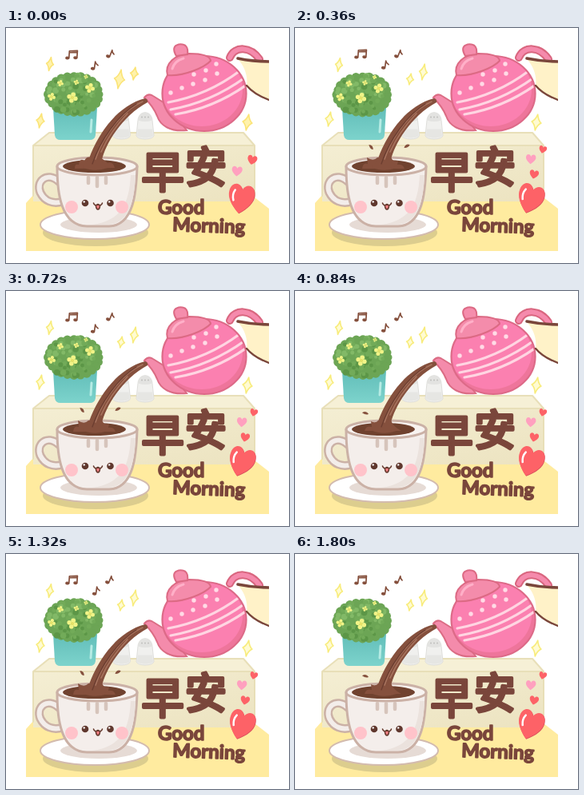
An HTML page for the animation above (1.92 s loop, 354x294 px).

```html
<!DOCTYPE html>
<html lang="zh-Hant">
<head>
<meta charset="utf-8">
<title>早安</title>
<style>
html, body { margin: 0; width: 354px; height: 294px; overflow: hidden; background: #fff; }
svg { display: block; }
text { fill: #7a463b; stroke: #7a463b; stroke-linejoin: round; stroke-linecap: round; }
.zh { font-family: "Noto Sans CJK TC", "Noto Sans CJK", sans-serif; font-weight: 400; stroke-width: 4; text-anchor: middle; }
.en { font-family: Lato, "Open Sans", sans-serif; font-weight: 700; font-size: 24px; stroke-width: 1.6; }
.line { fill: none; stroke-linecap: round; stroke-linejoin: round; }
</style>
</head>
<body>
<svg width="354" height="294" viewBox="0 0 354 294">
  <defs>
    <linearGradient id="pot" x2="0" y2="1"><stop stop-color="#62beb9"/><stop offset="1" stop-color="#7dd3cc"/></linearGradient>
    <linearGradient id="front" x2="1" y2="1"><stop stop-color="#f4eed3"/><stop offset="1" stop-color="#ece3c0"/></linearGradient>
    <clipPath id="body"><ellipse cx="248" cy="82" rx="52" ry="47"/></clipPath>
    <clipPath id="arm"><path d="M280 30H329V100H280Z"/></clipPath>
  </defs>

  <!-- counter -->
  <path d="M34 209L25 219V279H329V226L311 212Z" fill="#ffeb9f"/>
  <path d="M34 147H311V217H34Z" fill="url(#front)"/>
  <path d="M54 131H297L311 147H34Z" fill="#f6f0d6"/>
  <path class="line" d="M34 147L54 131H297L311 147H34V210M311 147V212" stroke="#e8dfb8" stroke-width="2"/>

  <!-- plant -->
  <path d="M59 100H114L112 134Q111 140 105 140H68Q62 140 61 134Z" fill="url(#pot)"/>
  <path class="line" d="M107 115L106 130" stroke="#b5ebe4" stroke-width="3"/>
  <g id="plant"></g>
  <g id="shakers"></g>

  <!-- teapot -->
  <path class="line" d="M280 37C286 22 306 23 317 39" stroke="#d9667f" stroke-width="10"/>
  <path class="line" d="M280 37C286 22 306 23 317 39" stroke="#f58aac" stroke-width="6"/>
  <path d="M173 87Q178 81 184 85L200 95L226 128C205 130 193 122 189 110Q184 98 173 87Z" fill="#f48bab" stroke="#db6c84" stroke-width="2"/>
  <g clip-path="url(#body)">
    <path d="M190 30H305V135H190Z" fill="#ee759b"/>
    <ellipse cx="245" cy="77" rx="51" ry="46" fill="#fb80b0"/>
    <path class="line" d="M203 93Q252 84 292 54M206 102Q256 93 299 62M212 108Q260 100 301 71" stroke="#ffd5e2" stroke-width="3.2"/>
    <g id="dots" fill="#ffdbe6"></g>
  </g>
  <ellipse cx="248" cy="82" rx="52.500" ry="47" fill="none" stroke="#dd6a88" stroke-width="2.200"/>
  <path d="M202 59C198 44 212 33 229 32C244 32 255 34 256 41C249 49 222 61 202 59Z" fill="#f48cab" stroke="#dc6a84" stroke-width="2"/>
  <path class="line" d="M208 51Q211 41 222 38" stroke="#ffb0c8" stroke-width="3"/>
  <path d="M213 35Q206 23 216 20.500Q229 19 227 33Z" fill="#f58dac" stroke="#dc6a84" stroke-width="2"/>
  <g clip-path="url(#arm)">
    <path d="M290 39Q309 43 330 42V91Q310 84 301 73C303 60 298 47 290 39Z" fill="#fff2c8"/>
    <path class="line" d="M290 38Q309 42 332 42" stroke="#7a463b" stroke-width="3.600"/>
    <path class="line" d="M301 72Q311 84 332 91" stroke="#7a463b" stroke-width="2.400"/>
  </g>

  <!-- saucer and cup -->
  <ellipse cx="112" cy="256" rx="66" ry="17" fill="#dccd8e"/>
  <ellipse cx="111" cy="246" rx="68" ry="18" fill="#fff" stroke="#d3bbae" stroke-width="2"/>
  <ellipse cx="116" cy="246" rx="48" ry="10" fill="#e6dbd5"/>
  <g class="line">
    <path id="handle" d="M66 192C51 179 37 192 43 206C48 216 58 221 71 217" stroke="#cbb1a6" stroke-width="11"/>
    <path d="M66 192C51 179 37 192 43 206C48 216 58 221 71 217" stroke="#f3edea" stroke-width="6"/>
  </g>
  <path d="M64 174C64 205 68 247 101 248H129C160 247 163 205 164 174Z" fill="#f4eeeb" stroke="#cbb1a6" stroke-width="3"/>
  <path d="M156 184C154 220 144 241 108 246H129C156 244 161 210 162 184Z" fill="#ebe2dd"/>
  <ellipse cx="114" cy="173" rx="50" ry="11" fill="#f8f3f0" stroke="#cbb1a6" stroke-width="3"/>
  <ellipse cx="110.500" cy="173" rx="39.500" ry="8" fill="#70422f"/>
  <path class="line" d="M103 187V194M114 187V198M125 187V194" stroke="#d6c4bb" stroke-width="4.500"/>
  <circle cx="82" cy="224" r="8" fill="#ffc3ca"/><circle cx="145" cy="224" r="8" fill="#ffc3ca"/>
  <g id="eyes"></g>
  <path d="M112.500 222H117.500Q117 227 115 227T112.500 222" fill="#f27f84"/>
  <path class="line" d="M109.500 219Q111 223.500 115 220.500Q119 223.500 120.500 219M112.500 223Q113 227 115 227T117.500 223" stroke="#65392d" stroke-width="1.600"/>

  <!-- pour -->
  <g id="splash"></g>
  <path d="M174 88C142 96 117 128 104 163Q101 171 95 174Q110 181 127 175Q120 172 120 165C124 146 145 110 177 93Q178 89 174 88Z" fill="#85503d"/>
  <path class="line" d="M171 92C147 102 122 133 112 164M152 107Q130 130 119 155" stroke="#a8745f" stroke-width="1.600"/>
  <path class="line" d="M163 95C140 109 118 140 108 170" stroke="#6b3d30" stroke-width="1.300"/>

  <text class="zh" x="196" y="200" font-size="53">早</text>
  <text class="zh" x="250" y="193" font-size="52">安</text>
  <text class="en" x="190" y="233">Good</text>
  <text class="en" x="208" y="254" transform="rotate(2 208 254)">Morning</text>

  <g id="notes"></g>
  <g id="stars"></g>
  <g id="hearts"></g>
</svg>
<script>
const STEP = 120, LOOP = 1920;
const RED = "#fd6267", PINK = "#ffa0bf", BROWN = "#85503d";
const $ = id => document.getElementById(id);
const disc = (x, y, r, fill) => `<circle cx="${x}" cy="${y}" r="${r}" fill="${fill}"/>`;
const place = (x, y, turn, body) => `<g transform="translate(${x} ${y}) rotate(${turn})">${body}</g>`;

function random(seed) {
  return () => (seed = seed * 16807 % 2147483647) / 2147483647;
}

function heart(x, y, r, turn, fill) {
  return place(x, y, turn, `<path d="M0 1C-.6.55-1.05.1-1-.4C-.95-1.08-.2-1.08 0-.5C.2-1.08.95-1.08 1-.4C1.05.1.6.55 0 1Z"
    transform="scale(${r})" fill="${fill}"/>`);
}

function bigHeart(x, y, turn) {
  const shape = '<path d="M0 19C-10 11-17 2-16-7C-15-19-4-20 0-11C4-20 15-19 16-7C17 2 10 11 0 19Z" ';
  return place(x, y, turn, shape + 'fill="#d84f5b" transform="translate(.7 .5)"/>' + shape + `fill="${RED}"/>` +
    '<path class="line" d="M-9-9Q-12-3-9 4" stroke="#fff" stroke-width="2.5"/>');
}

function star(x, y, w, h, line, fill) {
  const a = w * .3, b = h * .25;
  return place(x, y, 10, `<path d="M0-${h}Q${a}-${b} ${w} 0Q${a} ${b} 0 ${h}Q-${a} ${b}-${w} 0Q-${a}-${b} 0-${h}Z"
    fill="${fill}" stroke="${line}" stroke-width="1.6" stroke-linejoin="round"/>`);
}

function flower(x, y, r) {
  let s = "";
  for (let i = 0; i < 4; i++) {
    const a = i * Math.PI / 2 + .3;
    s += disc(x + Math.cos(a) * r, y + Math.sin(a) * r, r * .7, "#f1f487");
  }
  return s + disc(x, y, r * .5, "#e6e268");
}

function bush() {
  const rnd = random(71);
  let s = '<ellipse cx="85" cy="83" rx="34" ry="26" fill="#6ca555"/>';
  for (let i = 0; i < 24; i++) {
    const a = i * Math.PI / 12;
    s += disc(85 + Math.cos(a) * 32, 83 + Math.sin(a) * 23, 4.5 + rnd() * 1.5, "#6ca555");
  }
  for (let i = 0; i < 90; i++) {
    const a = rnd() * 6.28, d = Math.sqrt(rnd());
    const y = 83 + Math.sin(a) * d * 25, tone = rnd() + (y - 83) / 80;
    s += disc(85 + Math.cos(a) * d * 33, y, 2 + rnd() * 2, tone > .65 ? "#5c9647" : tone > .3 ? "#72ab59" : "#82b967");
  }
  const blooms = [[83, 87, 4], [105, 75, 3.6], [68, 69, 2.4], [57, 86, 3], [100, 61, 1.6], [88, 68, 2]];
  return s + blooms.map(b => flower(...b)).join("");
}

function note(x, y, turn, pair) {
  const d = pair ? "M-4 4V-5L6-6V3M-4-3L6-4" : "M1 4V-5Q2-2 5-1";
  const heads = pair ? [[-6, 4], [4, 3]] : [[-1, 4]];
  return place(x, y, turn, `<path class="line" d="${d}" stroke="${BROWN}" stroke-width="1.7"/>` +
    heads.map(([a, b]) => `<ellipse cx="${a}" cy="${b}" rx="2.6" ry="2" fill="${BROWN}"/>`).join(""));
}
const tune = (dx, dy) => note(83, 34 + dy, 4, true) + note(110 + dx, 47 - dx / 2, 8) + note(130 - dx / 2, 32, 22);

const sky = (line, fill, w, h, dx) =>
  star(55, 45 + dx / 2, 4.5, 8.5, line, fill) + star(142 + dx, 64, w, h, line, fill) +
  star(160.5, 57 - dx, 5, 8 + dx, line, fill) + star(43, 116 - dx, 5, 9, line, fill) + star(302, 118, 6, 10, line, fill);

const drop = (x, y, turn) => place(x, y, turn, `<path d="M-4-1Q1-4 4 1Q1 3-4-1Z" fill="${BROWN}"/>`);
const crown = d => `<path d="${d}" fill="${BROWN}"/>`;

// Each layer: the order in which its drawings follow, one digit per step, and the drawings.
const layers = {
  hearts: ["0011221122110011", [
    heart(308, 165, 6, 12, RED) + heart(289, 179, 6.5, 6, PINK) + bigHeart(294, 213, 10),
    heart(310, 152, 4.8, 14, RED) + heart(295, 164, 6.2, 5, PINK) + heart(299, 183, 5.7, 12, RED) + bigHeart(294.5, 213, 18),
    heart(288, 161, 6, 12, RED) + heart(304, 167, 4.8, 10, RED) + heart(296, 182, 6, 0, PINK) + bigHeart(294, 214, 2)
  ]],
  stars: ["0011111111110011", [
    sky("#fbe477", "#fff2ac", 6.5, 12, 0),
    sky("#f8ec7c", "#fffbd2", 4.5, 7, 2)
  ]],
  notes: ["0112", [tune(0, 0), tune(0, -1), tune(2, -1)]],
  plant: ["0011110000000011", [bush(), place(-.5, .5, 0, bush())]],
  splash: ["02120121", [
    crown("M86 176Q86 169 91 171Q92 162 98 166Q102 159 107 163L121 164Q125 167 127 169Q134 167 136 175Z"),
    crown("M87 175Q89 168 96 170L95 163Q101 166 104 162L120 162Q123 170 133 175Z") + drop(88, 153, -5),
    crown("M84 176Q85 168 91 170L90 162Q98 167 103 162H120Q123 168 129 166L128 171Q135 170 137 176Z") + drop(95, 149, 35) + drop(140, 148, -45)
  ]]
};

$("dots").innerHTML = [[206, 81], [220, 75], [234, 70], [249, 65], [264, 57], [235, 58], [250, 53], [263, 45]]
  .map(([x, y]) => `<circle cx="${x}" cy="${y}" r="2.7"/>`).join("");

$("eyes").innerHTML = [99, 130.5]
  .map(x => disc(x, 219, 4.3, "#60382e") + disc(x - 1.3, 217.4, 1.2, "#fff")).join("");

$("shakers").innerHTML = [144.5, 174].map(x => place(x, 122.5, 0,
  '<path d="M-9-7C-8-20 8-20 9-7L11 12C10 18-10 18-11 12Z" fill="#f0f0ee" stroke="#dededb"/>' +
  '<path d="M-9-7C-8-20 8-20 9-7Q0-4-9-7Z" fill="#e3e3e1"/>' +
  [-4, 0, 4].map(a => disc(a, -11, .9, "#bdbdba")).join("") +
  '<path d="M-9 4H9L10 12C9 16-9 16-10 12Z" fill="#e6e6e3"/>')).join("");

for (const [id, [, drawings]] of Object.entries(layers))
  $(id).innerHTML = drawings.map(d => `<g>${d}</g>`).join("");

function draw(time) {
  const step = Math.floor(time % LOOP / STEP);
  for (const [id, [order]] of Object.entries(layers)) {
    const shown = +order[step % order.length];
    [...$(id).children].forEach((g, i) => g.style.display = i === shown ? "" : "none");
  }
}

const start = performance.now();
function tick() {
  draw(performance.now() - start);
  requestAnimationFrame(tick);
}
tick();
</script>
</body>
</html>
```
